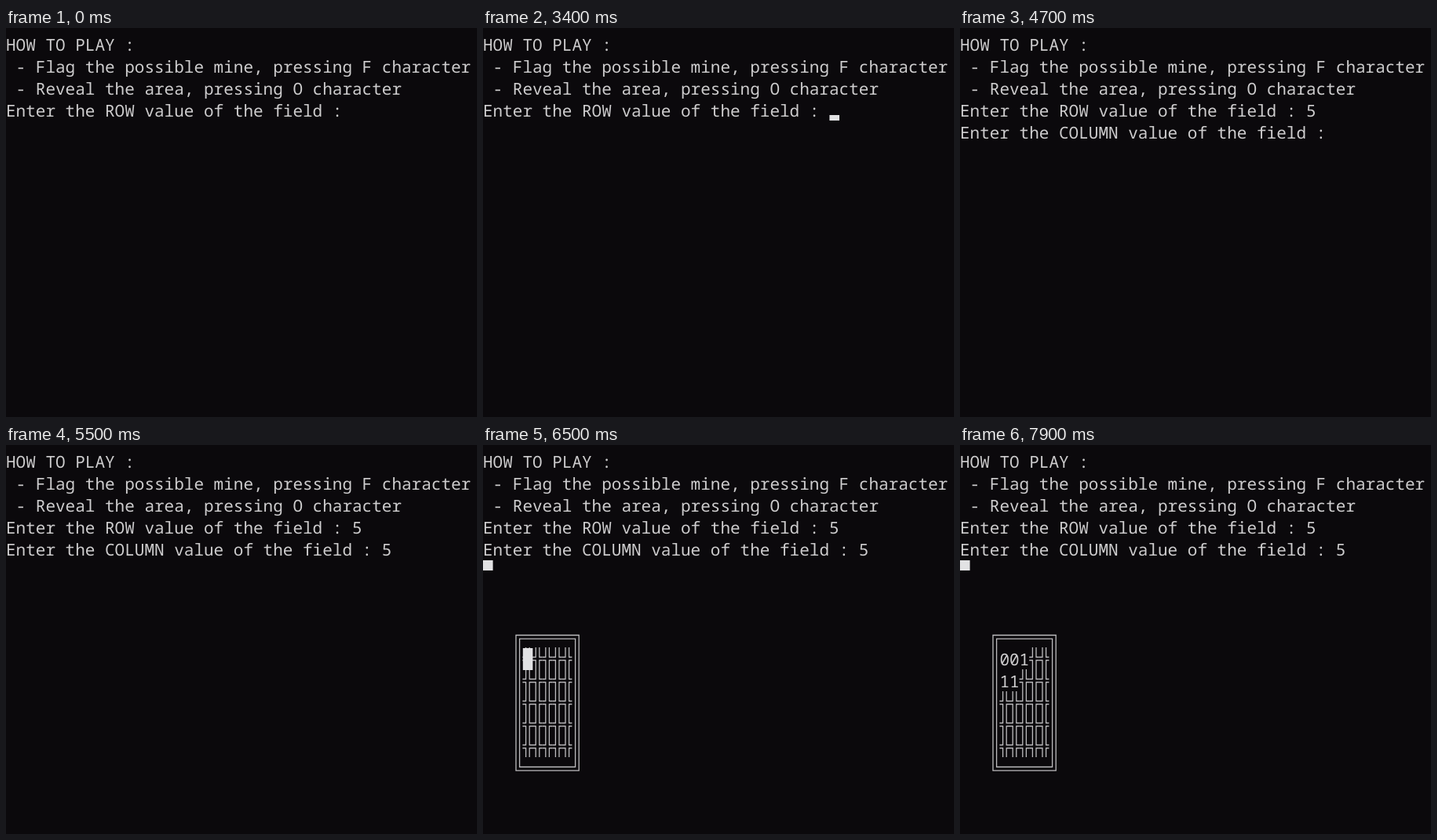
Write an HTML page that moves like this. It is 600x496 px and loops after 8000 ms.

```html
<!DOCTYPE html>
<html lang="en">
<head>
<meta charset="utf-8">
<title>Console minesweeper</title>
<style>
  html, body { margin: 0; width: 100%; height: 100%; overflow: hidden; background: #0b090c; }
  svg { display: block; width: 600px; height: 496px; }
  text {
    font: 21px "Noto Sans Mono", "DejaVu Sans Mono", monospace;
    fill: #cecdce; white-space: pre; text-rendering: geometricPrecision;
  }
  path { fill: none; stroke: #bdbcbe; stroke-width: 1.3; }
  rect { fill: #e2e2e4; }
</style>
</head>
<body>
<svg id="stage" viewBox="0 0 600 496"></svg>
<script>
const LOOP = 8000, COL = 12.6, ROW = 28, FIRST_Y = 6;
const BOARD_AT = 5600, REVEAL_AT = 6900;
const svg = document.getElementById("stage");
const parts = [];

// Adds an element that is visible during the given [start, end) spans.
function add(tag, attrs, spans, content = "") {
  const el = document.createElementNS("http://www.w3.org/2000/svg", tag);
  for (const key in attrs) el.setAttribute(key, attrs[key]);
  el.textContent = content;
  svg.append(el);
  parts.push({ el, spans });
}

const from = start => [[start, LOOP]];
const cellX = col => col * COL;
const cellY = row => FIRST_Y + row * ROW;

function write(content, col, row, start = 0) {
  add("text", { x: cellX(col), y: cellY(row) + 23 }, from(start), content);
}

function block(col, row, dy, height, spans) {
  add("rect", { x: cellX(col) + 0.4, y: cellY(row) + dy, width: COL, height }, spans);
}

const underscore = (col, row, ...spans) => block(col, row, 21, 7, spans);

// Double-line cross: four corners meeting around the cell centre.
function cross(col, row) {
  const x = cellX(col), y = cellY(row), cx = x + COL / 2 + 0.2, cy = y + ROW / 2 + 0.5;
  const corner = (sx, sy) =>
    `M${cx + sx * 2.3} ${sy < 0 ? y : y + ROW}V${cy + sy * 2}H${sx < 0 ? x : x + COL}`;
  return corner(-1, -1) + corner(1, -1) + corner(-1, 1) + corner(1, 1);
}

function border(col, row, cols, rows) {
  for (const d of [-2.3, 2.3]) {
    const x = cellX(col) + COL / 2 + 0.2 - d, y = cellY(row) + ROW / 2 + 0.8 - d;
    const w = (cols + 1) * COL + 2 * d, h = (rows + 1) * ROW + 2 * d;
    add("path", { d: `M${x} ${y}h${w}v${h}h${-w}z` }, from(BOARD_AT));
  }
}

write("HOW TO PLAY :", 0, 0);
write(" - Flag the possible mine, pressing F character", 0, 1);
write(" - Reveal the area, pressing O character", 0, 2);
write("Enter the ROW value of the field :", 0, 3);
write("5", 35, 3, 4000);
write("Enter the COLUMN value of the field :", 0, 4, 4400);
write("5", 38, 4, 5200);

underscore(35, 3, [2200, 2700], [3200, 3700]);
underscore(36, 3, [4200, 4400]);
underscore(38, 4, [4900, 5200]);
block(-0.03, 5, 1, 13, from(BOARD_AT));

const size = 5, boardCol = 4, boardRow = 9, opened = ["001", "11"];
border(boardCol - 1, boardRow - 1, size, size);
for (let r = 0; r < size; r++) {
  const digits = opened[r] || "";
  for (let c = 0; c < size; c++) {
    const spans = c < digits.length ? [[BOARD_AT, REVEAL_AT]] : from(BOARD_AT);
    add("path", { d: cross(boardCol + c, boardRow + r) }, spans);
  }
  if (digits) write(digits, boardCol, boardRow + r, REVEAL_AT);
}
block(boardCol, boardRow, 1, 28, [[BOARD_AT, REVEAL_AT]]);

const startTime = performance.now();
function draw(now) {
  const t = Math.max(0, now - startTime) % LOOP;
  for (const { el, spans } of parts) {
    const on = spans.some(([a, b]) => t >= a && t < b);
    el.setAttribute("visibility", on ? "visible" : "hidden");
  }
  requestAnimationFrame(draw);
}
draw(startTime);
</script>
</body>
</html>
```
